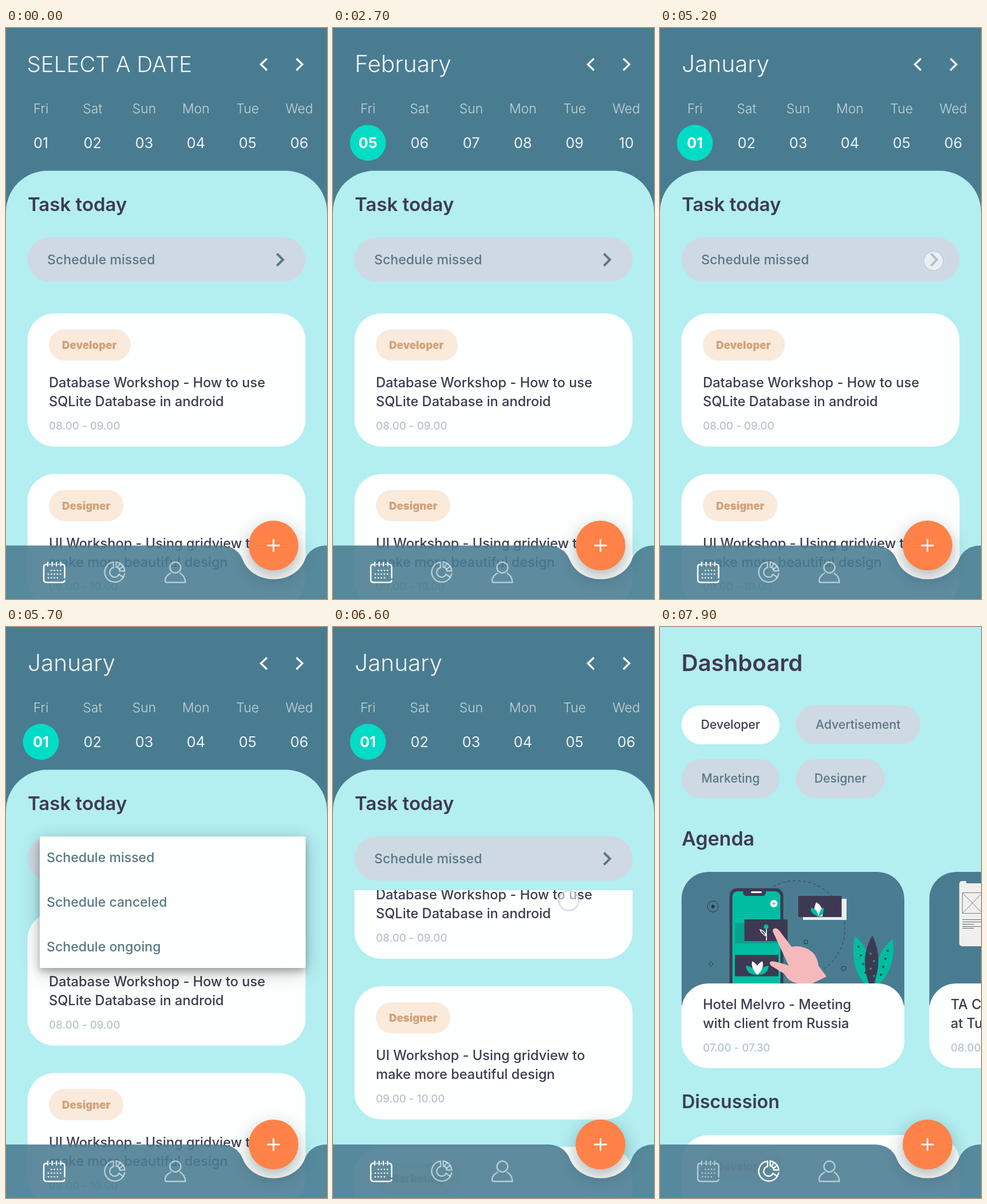
Write an HTML page with a canvas that moves like this. It is 561x998 px and loops after 8000 ms.

```html
<!DOCTYPE html>
<html lang="en">
<head>
<meta charset="utf-8">
<title>Task planner</title>
<style>
html, body { margin: 0; width: 100%; height: 100%; overflow: hidden; background: #b3eef1; }
canvas { display: block; width: 561px; height: 998px; }
</style>
</head>
<body>
<canvas id="stage" width="561" height="998"></canvas>
<script>
const ctx = document.getElementById('stage').getContext('2d');
const LOOP = 8000, STEP = 100, W = 561, H = 998;
const SLATE = '#4a7c91', SKY = '#b3eef1', INK = '#3e3b50', PILL = '#cfd9e3', MUTED = '#587884',
  PAPER = '#fcfffd', TIME = '#b6c3cc', TEAL = '#00dcc5', GREEN = '#00bda2', DARK = '#3e3953';
const BODY = 23.6;
const DAYS = ['Fri', 'Sat', 'Sun', 'Mon', 'Tue', 'Wed'];
const DAY_GAP = 90.3;
const TASKS = [
  ['Developer', 143, 'Database Workshop - How to use', 'SQLite Database in android', '08.00 - 09.00'],
  ['Designer', 130, 'UI Workshop - Using gridview to', 'make more beautiful design', '09.00 - 10.00'],
  ['Marketing', 147, 'QZ Ads - Strategy marketing for', 'selling more products', '12.00 - 12.30']
];

// Taps and drags: time held, position, and optional drag destination.
const TOUCHES = [
  { from: 500, to: 700, x: 61, y: 203 },
  { from: 1400, to: 1600, x: 516, y: 64 },
  { from: 1700, to: 2200, x: 440, y: 215, x2: 90, y2: 212 },
  { from: 2300, to: 2500, x: 62, y: 203 },
  { from: 3400, to: 4200, x: 130, y: 214, x2: 471, y2: 230 },
  { from: 4400, to: 4600, x: 452, y: 64 },
  { from: 5000, to: 5200, x: 478, y: 407 },
  { from: 6200, to: 6700, x: 412, y: 630, scrolls: true },
  { from: 7000, to: 7200, x: 182, y: 978 }
];

const clamp = v => Math.max(0, Math.min(1, v));
function ramp(t, a, b) {
  const p = clamp((t - a) / (b - a));
  return p * p * (3 - 2 * p);
}
const between = (t, a, b) => t >= a && t < b;
const listScroll = t => 460 * ramp(t, 6350, 7000);

function box(x, y, w, h, r, fill) {
  ctx.beginPath();
  ctx.roundRect(x, y, w, h, r);
  ctx.fillStyle = fill;
  ctx.fill();
}
function disc(x, y, r, fill) {
  ctx.beginPath();
  ctx.arc(x, y, r, 0, 7);
  ctx.fillStyle = fill;
  ctx.fill();
}
function shape(d, fill) {
  ctx.fillStyle = fill;
  ctx.fill(new Path2D(d));
}
function line(d, color, width) {
  ctx.strokeStyle = color;
  ctx.lineWidth = width;
  ctx.stroke(new Path2D(d));
}
function text(str, x, y, size, weight, color, align = 'left') {
  ctx.font = `${weight} ${size}px Inter, sans-serif`;
  ctx.textAlign = align;
  ctx.fillStyle = color;
  ctx.fillText(str, x, y);
}
function shadow(color, blur, dy) {
  ctx.shadowColor = color;
  ctx.shadowBlur = blur;
  ctx.shadowOffsetY = dy;
}

function taskCard([tag, tagWidth, first, second, time], y) {
  box(37.5, y, 486, 233, 47, PAPER);
  box(75, y + 28, tagWidth, 54.5, 27, '#faeadb');
  text(tag, 98, y + 62, 18.6, 900, '#d2a27b');
  text(first, 75, y + 129.3, BODY, 550, INK);
  text(second, 75, y + 162, BODY, 550, INK);
  text(time, 75, y + 203.5, 18.8, 500, TIME);
}

function calendar(t) {
  ctx.fillStyle = SLATE;
  ctx.fillRect(0, 0, W, H);
  const january = between(t, 700, 1600) || t >= 4600;
  const selected = between(t, 700, 1600) || between(t, 2400, 3300) || t >= 4700;
  if (t < 700) text('SELECT A DATE', 36.5, 77, 38.5, 350, '#eef5f6');
  else text(january ? 'January' : 'February', 38, 77, 40.6, 350, '#eef5f6');
  line('M456 53.5 L445.5 63.5 L456 74', '#f4f8f8', 3.4);
  line('M507.5 53.5 L518 63.5 L507.5 74', '#f4f8f8', 3.4);

  const first = 4 * (ramp(t, 1700, 2200) - ramp(t, 3400, 4100));
  if (selected) disc(61, 200.7, 31.4, TEAL);
  DAYS.forEach((day, i) => text(day, 61 + DAY_GAP * i, 148.5, 23, 350, '#c4d5d9', 'center'));
  for (let i = 0; i < 11; i++) {
    const on = selected && Math.abs(i - first) < .5;
    text(String(i + 1).padStart(2, '0'), 61 + DAY_GAP * (i - first), 210, 25.3,
      on ? 700 : 400, on ? '#fff' : '#e9f2f3', 'center');
  }

  box(0, 249.5, W, H, 72, SKY);
  text('Task today', 38, 319.5, 33, 600, INK);
  box(37.5, 366, 486, 77.5, 38.7, PILL);
  text('Schedule missed', 72, 413, 23.1, 550, MUTED);
  line('M473.5 394.5 L484 405 L473.5 415.5', MUTED, 4);

  ctx.save();
  ctx.beginPath();
  ctx.rect(0, 460, W, H);
  ctx.clip();
  TASKS.forEach((task, i) => taskCard(task, 498.7 + 280.8 * i - listScroll(t)));
  ctx.restore();
  popup(t);
}

function popup(t) {
  const open = ramp(t, 5200, 5500);
  const alpha = open * (1 - clamp((t - 5700) / 150));
  if (!alpha) return;
  ctx.save();
  ctx.globalAlpha = alpha;
  const w = 464.5 * (.4 + .6 * open), h = 230 * open;
  shadow('rgba(0,0,0,.22)', 34, 8);
  box(523.5 - w, 366, w, h, 2, PAPER);
  shadow('rgba(0,0,0,.25)', 12, 6);
  ctx.fill();
  shadow('transparent', 0, 0);
  ctx.clip();
  ['missed', 'canceled', 'ongoing'].forEach((word, i) =>
    text('Schedule ' + word, 71, 411 + 78 * i, 23.1, 550, MUTED));
  ctx.restore();
}

function chip(label, x, y, w, on) {
  box(x, y, w, 68, 34, on ? PAPER : PILL);
  text(label, x + w / 2, y + 41, 21.2, 550, on ? INK : MUTED, 'center');
}
function agendaCard(x, art, first, second, time) {
  ctx.save();
  ctx.beginPath();
  ctx.roundRect(x, 428, 389.5, 233, [47, 47, 0, 0]);
  ctx.clip();
  ctx.fillStyle = SLATE;
  ctx.fill();
  art();
  ctx.restore();
  box(x, 623, 389.5, 148, 47, PAPER);
  text(first, x + 37.5, 668, BODY, 550, INK);
  text(second, x + 37.5, 701, BODY, 550, INK);
  text(time, x + 37.5, 742, 18.8, 500, TIME);
}

function phoneArt() {
  ctx.setLineDash([5, 4]);
  line('M154 528 a84.5 84.5 0 1 1 169 0 a84.5 84.5 0 1 1 -169 0', DARK, 1);
  ctx.setLineDash([]);
  line('M83 488.5 a9.5 9.5 0 1 1 19 0 a9.5 9.5 0 1 1 -19 0', '#263642', 1);
  disc(92.5, 488.5, 3, '#263642');
  line('M89 585 l4 4 l-4 4 l-4 -4 Z M252 547.5 h6 v6 h-6 Z M317 597 a4 4 0 1 1 8 0 a4 4 0 1 1 -8 0', '#263642', 1);

  box(121.5, 456.5, 94, 190, 13, DARK);
  box(126.5, 462, 84, 190, 9, GREEN);
  box(145, 458, 40, 12, 6, DARK);
  box(159, 462, 19, 3, 1.5, PAPER);
  disc(199, 483.5, 6.5, PAPER);
  line('M196 483.5 h6 M199 480.5 v6', GREEN, 1);
  box(131, 517, 76, 36, 0, '#07a18e');
  box(147.5, 511, 75.5, 38, 0, DARK);
  line('M186 526 V548 M186 540 Q178 537 175 529 Q183 531 186 540', PAPER, 1.6);
  disc(185.5, 524, 4, GREEN);
  box(131, 573, 76, 37.5, 0, DARK);
  shape('M170 608 Q151 608 150 592 Q164 593 170 608 Q176 593 190 592 Q189 608 170 608', GREEN);
  shape('M170 608 Q158 596 161 584 Q168 588 170 592 Q173 587 179 584 Q183 597 170 608', PAPER);

  box(250, 475, 76, 37, 0, '#eceeed');
  box(241.5, 470, 76, 37, 0, DARK);
  shape('M276 506 Q265 499 273 481 Q286 488 284 506 Z', PAPER);
  shape('M277 506 Q262 501 264 491 Q274 491 277 506 Q279 494 286 490 Q288 503 277 506', GREEN);
  shape('M198 528 Q203 524 208 530 L230 559 Q250 555 267 569 Q275 577 277 592 L291 611 L258 627 L237 622 Q224 619 217 606 L194 592 Q189 586 195 584 Q206 585 225 592 L198 534 Q196 530 198 528', '#f5b9bb');

  shape('M362 628 Q331 600 340 540 Q373 565 369 628 Z M378 628 Q371 573 407 545 Q413 601 378 628', GREEN);
  shape('M371 539 Q392 580 372 628 H367 Q347 580 371 539', DARK);
  for (let i = 0; i < 4; i++) {
    disc(347 + 4 * i, 559 + 15 * i, 2, DARK);
    disc(398 - 4 * i, 566 + 14 * i, 2, DARK);
    disc(368 + i % 2 * 6, 571 + 13 * i, 1.7, GREEN);
  }
}
function wireframeArt() {
  box(523, 444, 90, 114, 5, '#eff0ee');
  box(535, 443, 90, 5, 3, SLATE);
  line('M528.5 464.5 h70 v36 h-70 Z M528.5 464.5 l35 36 M528.5 500.5 l35 -36', '#7b8084', 1);
  line('M528.5 511.5 h60 M528.5 515.5 h60 M528.5 519.5 h20 M528.5 523.5 h60 M528.5 526.5 h20', '#62686f', 1);
}

function dashboard() {
  ctx.fillStyle = SKY;
  ctx.fillRect(0, 0, W, H);
  text('Dashboard', 37.5, 77, 40.2, 600, INK);
  chip('Developer', 37.5, 137, 171.5, true);
  chip('Advertisement', 237.5, 137, 217.5);
  chip('Marketing', 37.5, 231, 171.5);
  chip('Designer', 237.5, 231, 155.5);
  text('Agenda', 38, 382, 34, 600, INK);
  agendaCard(37.5, phoneArt, 'Hotel Melvro - Meeting', 'with client from Russia', '07.00 - 07.30');
  agendaCard(470.5, wireframeArt, 'TA Council', 'at Tulip room', '08.00 - 09.00');
  text('Discussion', 38, 841, 32.2, 600, INK);
  taskCard(TASKS[0], 888);
}

function navigation(active) {
  shape('M0 904.5 H374 C396 904.5 408 915 414 930 C422 950 443 963.5 468 963.5 C493 963.5 514 950 522 930 C528 915 540 904.5 561 904.5 V998 H0 Z', 'rgba(75,125,147,.89)');
  const tint = i => active === i ? '#fff' : 'rgba(222,236,239,.68)';
  ctx.lineCap = 'round';

  line('M98 937.5 Q102.5 937.5 102.5 942 V961 M102.5 966 Q102 969 98 969 H71 Q66 969 66 964 V942 Q66 937.5 71 937.5', tint(0), 2.5);
  line('M73 934 v6 M80.5 934 v6 M88 934 v6 M95.5 934 v6 M77 937.5 h0 M84.5 937.5 h0 M92 937.5 h0', tint(0), 2.4);
  for (let i = 1; i < 14; i++) disc(74 + i % 5 * 5.3, 948 + Math.floor(i / 5) * 6.5, 1.3, tint(0));

  // Ring chart with its upper right quarter pulled out and hatched.
  line('M188 933.6 A17.5 17.5 0 1 0 205 960 M188 943 A8.5 8.5 0 1 0 197.5 955 M188 933.6 V943', tint(1), 2.4);
  line('M192.5 933.5 A17 17 0 0 1 207.5 949 H199 A8 8 0 0 0 192.5 942 Z M207.5 954 L205 960 L197.5 955', tint(1), 2.4);
  line('M199.5 936 L195 942 M205 941 L198 946', tint(1), 2.2);

  line('M286.5 943 a9.5 9.5 0 1 1 19 0 a9.5 9.5 0 1 1 -19 0 M287.5 953 Q278 958 278 966 Q278 969 281 969 H313.5 Q313 958 304.5 953', tint(2), 2.4);
  ctx.lineCap = 'butt';

  shadow('rgba(20,35,45,.34)', 30, 11);
  disc(467.5, 904.5, 43.5, '#ff8249');
  shadow('transparent', 0, 0);
  line('M456.5 904.5 h22 M467.5 893.5 v22', '#fff', 2.8);
}

function touches(t) {
  for (const p of TOUCHES) {
    const alpha = clamp((t - p.from + 100) / 200) * (1 - clamp((t - p.to) / 200));
    if (!alpha) continue;
    const k = ramp(t, p.from, p.to);
    const x = p.x + ((p.x2 ?? p.x) - p.x) * k;
    const y = p.scrolls ? p.y - listScroll(t) : p.y + ((p.y2 ?? p.y) - p.y) * k;
    ctx.save();
    ctx.globalAlpha = alpha;
    disc(x, y, 20, 'rgba(255,255,255,.1)');
    disc(x, y, 16.5, 'rgba(255,255,255,.5)');
    ctx.beginPath();
    ctx.arc(x, y, 17.3, 0, 7);
    ctx.strokeStyle = 'rgba(188,204,226,.8)';
    ctx.lineWidth = 2;
    ctx.stroke();
    ctx.restore();
  }
}

function draw(t) {
  const onDashboard = t >= 7400;
  if (onDashboard) dashboard();
  else calendar(t);
  navigation(onDashboard ? 1 : 0);
  touches(t);
}

let start;
function frame(now) {
  start ??= now;
  draw(Math.floor((now - start) % LOOP / STEP) * STEP);
  requestAnimationFrame(frame);
}
requestAnimationFrame(frame);
</script>
</body>
</html>
```
